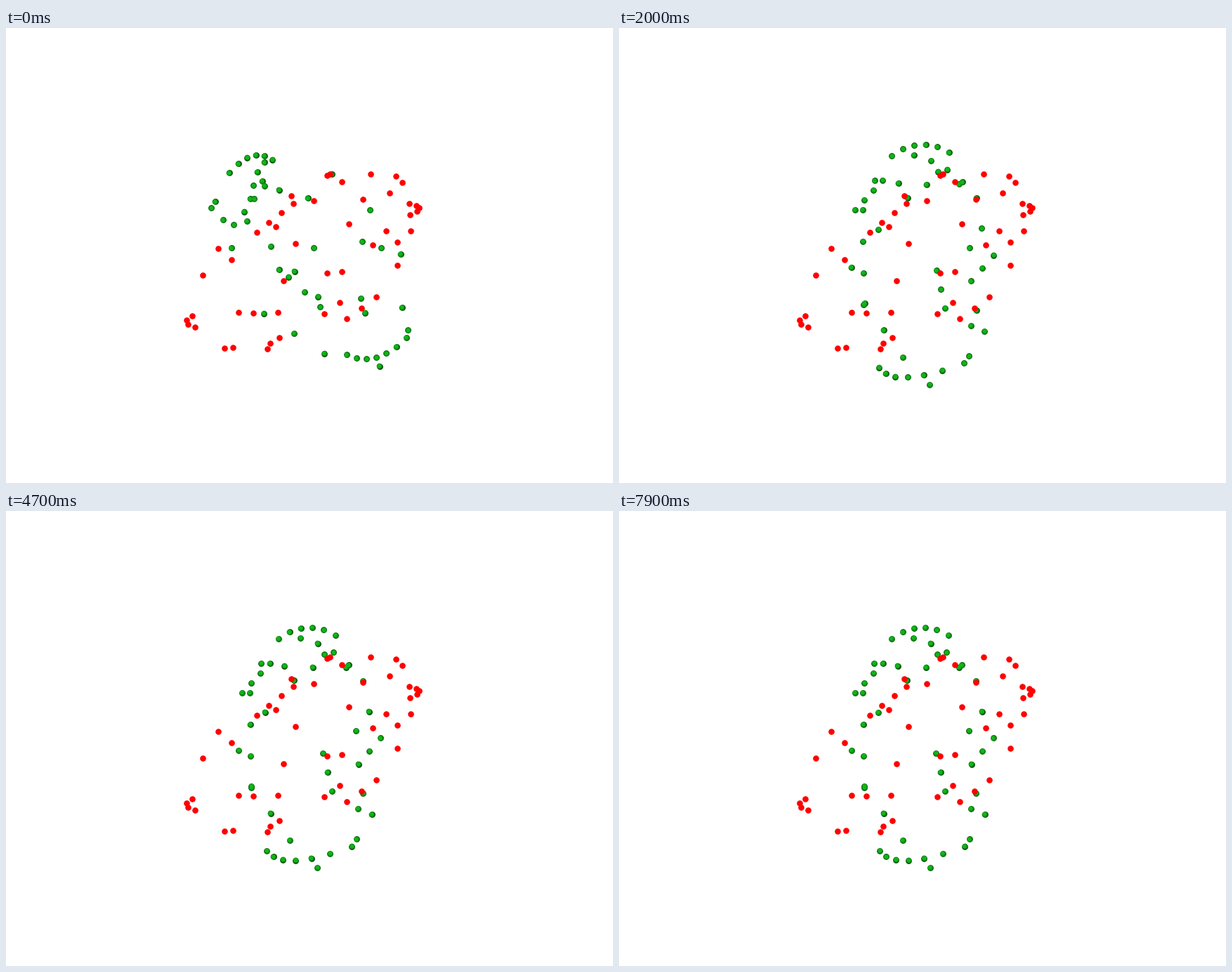
Animation, 864 px wide and 648 px high, one loop 8 s. Source, as a matplotlib script:

```python
import numpy as np
import matplotlib.pyplot as plt
from matplotlib.animation import FuncAnimation

W, H = 864, 648
STEP, LOOP = 100, 8000
PIVOT = np.array([429, 333])


def strand(n, *keys):
    """n even samples on the line (2 keys) or parabola (3 keys) through the keys."""
    keys = np.array(keys, float)
    t = np.linspace(0, 1, n)[:, None]
    if len(keys) == 2:
        return keys[0] + (keys[1] - keys[0]) * t
    a, m, b = keys
    return a * (1 - t) * (1 - 2 * t) + m * 4 * t * (1 - t) + b * t * (2 * t - 1)


# Red cloud, flat: x, y
FIXED = np.vstack([
    strand(5, (574, 250), (588, 256), (575, 266)),
    strand(4, (518.5, 208), (562.5, 215), (546, 235)),
    strand(4, (457, 210), (468, 211.5), (508, 243.5)),
    strand(3, (487.5, 279), (556.5, 338)),
    strand(3, (541, 289), (556.5, 304.5), (576, 289)),
    strand(4, (409, 249.5), (357, 290.5)),
    strand(5, (438, 246), (395, 360), (389, 441)),
    strand(2, (406, 239), (384, 282.5)),
    strand(3, (280, 352), (301.5, 313.5), (321, 329.5)),
    strand(4, (264.5, 410), (257, 419), (268.5, 426)),
    strand(2, (331, 404.5), (352, 405.5)),
    strand(2, (311, 455.5), (323, 454.5)),
    strand(2, (376, 449), (371.5, 457)),
    strand(2, (453, 407), (475, 390.5)),
    strand(2, (456.5, 348.5), (477.5, 347)),
    strand(3, (485, 414), (527, 383)),
])

# Green cloud in its settled pose: x, y, depth
MOVING = np.vstack([
    strand(6, (388, 182, -3), (428, 166, -3), (469, 177, -3.6)),
    strand(5, (419.5, 181, -1.5), (466.5, 201.5, -4.8), (508, 242, -3.5)),
    strand(4, (375.5, 217, 0.6), (336, 259, -0.6)),
    strand(4, (363.5, 217, -3.4), (416, 222, -5.6), (484, 222.5, 0.5)),
    strand(4, (331, 341, 2.8), (389, 263, -4.9), (453.5, 204.5, -4.9)),
    strand(4, (347, 259, 0), (349, 394, 4.7)),
    strand(3, (349.5, 392, -0.5), (404, 469, 0.9)),
    strand(7, (371, 484, 4.8), (412, 497.5, 5), (492, 477.5, 3.4)),
    strand(4, (443, 508, 3.3), (514, 449, 2.8), (508.5, 402, -0.8)),
    strand(3, (464, 399, -2), (451.5, 345, -3.5)),
    strand(3, (501.5, 360.5, 4), (533, 323.5, -1)),
    strand(3, (501, 424, -0.3), (498.5, 313, -3.4), (516.5, 285.5, 1.3)),
])

# Opening view of the same cloud, before it is registered
OPENING = MOVING @ np.array([(0.885, -0.207), (0.219, 0.976), (14.9, -5)]) + (-20.8, 93.9)

# Bursts of refinement: (start ms, updates 100 ms apart)
BURSTS = [(200, 1), (500, 7), (1400, 4), (2000, 1), (2300, 6), (3100, 1),
          (3400, 3), (3900, 2), (4300, 1), (4600, 6), (5400, 4), (6000, 3),
          (6500, 9), (7400, 2), (7800, 2)]
UPDATES = np.array([s + k * STEP for s, n in BURSTS for k in range(n)])


def pose_at(t):
    """Sway and turn (degrees) after the update at time t."""
    if t < 500:
        return -1, 0
    if t <= 1100:
        return 1, -85 * ((1100 - t) / 600) ** 3
    ring = np.cos(np.pi * (t - 1100) / 850)
    return 0.16 * np.exp((2000 - t) / 3000) * ring, 0


def points_at(ms):
    if ms < UPDATES[0]:
        return OPENING
    sway, turn = pose_at(UPDATES[UPDATES <= ms][-1])
    c, s = np.cos(np.radians(turn)), np.sin(np.radians(turn))
    zoom = 1 + 0.156 * abs(s)
    rel = MOVING[:, :2] + sway * MOVING[:, 2:] * (1, 0.27) - PIVOT
    return rel @ np.array([(c, s), (-s, c)]) * zoom + PIVOT


fig = plt.figure(figsize=(W / 72, H / 72), dpi=72, facecolor="white")
ax = fig.add_axes((0, 0, 1, 1))
ax.set(xlim=(0, W), ylim=(H, 0))
ax.axis("off")


def dots(pts, radius, color, z):
    return ax.scatter(pts[:, 0], pts[:, 1], s=(2 * radius) ** 2, c=color,
                      linewidths=0, antialiased=False, zorder=z)


dots(FIXED, 4.3, "#ff0000", 3)

# Shaded ball: dark rim, body, lit side
SHADES = [(4.4, "#064f06", 0), (3.9, "#0a8a10", -0.3), (3.0, "#10b418", -0.6)]
balls = [(dots(OPENING + off, r, col, 2 + 0.1 * i), off)
         for i, (r, col, off) in enumerate(SHADES)]


def draw(i):
    pts = points_at(i * STEP)
    for layer, off in balls:
        layer.set_offsets(pts + off)
    return [layer for layer, _ in balls]


anim = FuncAnimation(fig, draw, frames=LOOP // STEP, interval=STEP,
                     repeat=True, repeat_delay=0)
plt.show()
```
